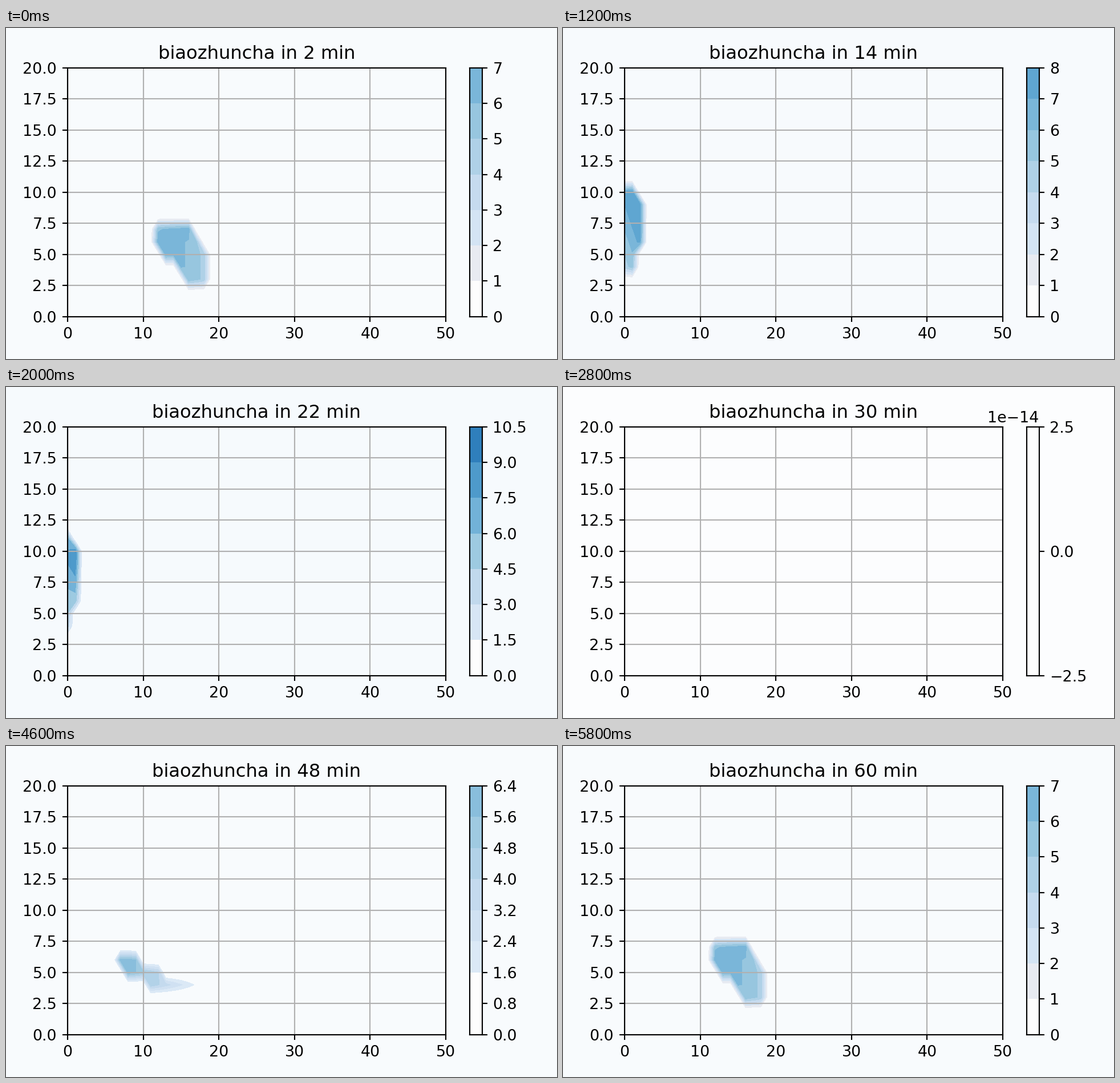
Recreate the animation shown at these times as a matplotlib script. Size 966x580 px, loop 6 s.

```python
import numpy as np
import matplotlib.pyplot as plt
from matplotlib.animation import FuncAnimation
from matplotlib.ticker import MaxNLocator

W, H, DPI = 966, 580, 193.2
FRAMES, INTERVAL = 30, 200
VMAX = 14          # value at the dark end of the colour map
FAINT = 1.22       # bands below this stay white

plt.rcParams["font.family"] = "DejaVu Sans"

Y, X = np.mgrid[0:21, 0:51]


def blob(bottom, top, left, right, value):
    """Cells between two edges, filled by a formula; zero elsewhere."""
    inside = (Y >= bottom) & (Y <= top) & (X >= left) & (X <= right)
    return np.where(inside, value, 0.0)


EMPTY = np.zeros(X.shape)
WALL = blob(4, 10, 0, np.minimum(2, np.minimum(11 - Y, Y / 2 - 1)),
            np.minimum(7.9, 2.5 + 0.5 * Y + 0.9 * X))
LEAVING = blob(4, 11, 0, np.minimum(1, np.minimum(11 - Y, Y / 2 - 2)),
               np.minimum(0.75 * (Y + 1), 17.6 - Y) + 0.36 * (Y - 6) * X)
SEED = blob(4, 5, 3 + Y, 13 - Y,
            3.3 - 0.8 * (5 - Y) - 0.5 * abs(X - 8))
TRAIL = blob(4, 6, np.maximum(7, 23 - 3 * Y), np.maximum(9, 37 - 5 * Y),
             np.minimum(6.1, 10.3 - 0.52 * X))
CLOUD = blob(3, 7, np.maximum(12, 20.5 - 1.5 * Y), np.minimum(18, 23 - Y),
             6.7 - 0.055 * (X - 12 - 4 * np.maximum(0, Y - 6)) ** 2)

KEYS = [(0, CLOUD), (1, EMPTY), (6, WALL), (10, LEAVING), (13, EMPTY),
        (15, EMPTY), (18, SEED), (23, TRAIL), (29, CLOUD)]


def center(z):
    return np.array([(Y * z).sum(), (X * z).sum()]) / z.sum()


def blend(a, b, t):
    """Carry a towards b in whole cells while mixing their values."""
    if not a.any() or not b.any():
        return a * (1 - t) + b * t
    d = center(b) - center(a)
    sa = np.rint(d * t).astype(int)
    sb = sa - np.rint(d).astype(int)
    z = np.roll(a, sa, (0, 1)) * (1 - t) + np.roll(b, sb, (0, 1)) * t
    peak = a.max() * (1 - t) + b.max() * t
    return z * peak / z.max()


def state(i):
    for (i0, a), (i1, b) in zip(KEYS, KEYS[1:]):
        if i <= i1:
            return blend(a, b, (i - i0) / (i1 - i0))


def shade(v):
    if v < FAINT:
        return (0.992, 0.992, 0.994)
    if v < 1.6:
        return (0.908, 0.922, 0.95)
    return plt.cm.Blues(v / VMAX)[:3]


def backdrop(peak):
    """The page turns slightly bluer as the peak grows."""
    return (np.array([252, 253, 254]) - peak * np.array([0.62, 0.35, 0.1])) / 255


def levels_for(peak):
    ticks = MaxNLocator(8, min_n_ticks=1).tick_values(0, peak)
    last = np.argmax(ticks >= peak - 1e-9)
    return ticks[:last + 1]


def place(x0, x1):
    bottom, top = 74.4, 510.2
    return fig.add_axes([x0 / W, bottom / H, (x1 - x0) / W, (top - bottom) / H])


# The tiny margin keeps the pixel size from rounding down.
fig = plt.figure(figsize=((W + 1e-6) / DPI, (H + 1e-6) / DPI), dpi=DPI)
ax = place(107.9, 771)
cax = place(812.9, 834.7)
ax.set(xlim=(0, 50), ylim=(0, 20), facecolor="none")
ax.set_yticks(np.arange(0, 20.1, 2.5))
ax.grid(True)
title = ax.set_title("")
power = fig.text(834 / W, (H - 61.7) / H, "1e\u221214", size=10, ha="right")
fills = []


def draw_bar(levels, colors):
    cax.clear()
    for lo, hi, color in zip(levels, levels[1:], colors):
        cax.axhspan(lo, hi, color=color, lw=0)
    cax.set_xticks([])
    cax.set_ylim(levels[0], levels[-1])
    cax.yaxis.tick_right()
    decimals = 0 if np.allclose(levels, np.rint(levels)) else 1
    labels = [f"{v:.{decimals}f}".replace("-", "\u2212") for v in levels]
    cax.set_yticks(levels, labels)


def draw(i):
    z = state(i)
    peak = z.max()
    while fills:
        fills.pop().remove()
    fig.set_facecolor(backdrop(peak))
    title.set_text(f"biaozhuncha in {2 * i + 2} min")
    power.set_visible(peak == 0)
    if peak == 0:
        draw_bar([-2.5, 0, 2.5], [shade(0)] * 2)
        return
    levels = levels_for(peak)
    mids = (levels[1:] + levels[:-1]) / 2
    colors = [shade(m) for m in mids]
    draw_bar(levels, colors)
    first = int((mids < FAINT).sum())
    if first < len(mids):
        fills.append(ax.contourf(z, levels=levels[first:], colors=colors[first:]))
        ax.set(xlim=(0, 50), ylim=(0, 20))


anim = FuncAnimation(fig, draw, frames=FRAMES, interval=INTERVAL, repeat=True)
plt.show()
```
